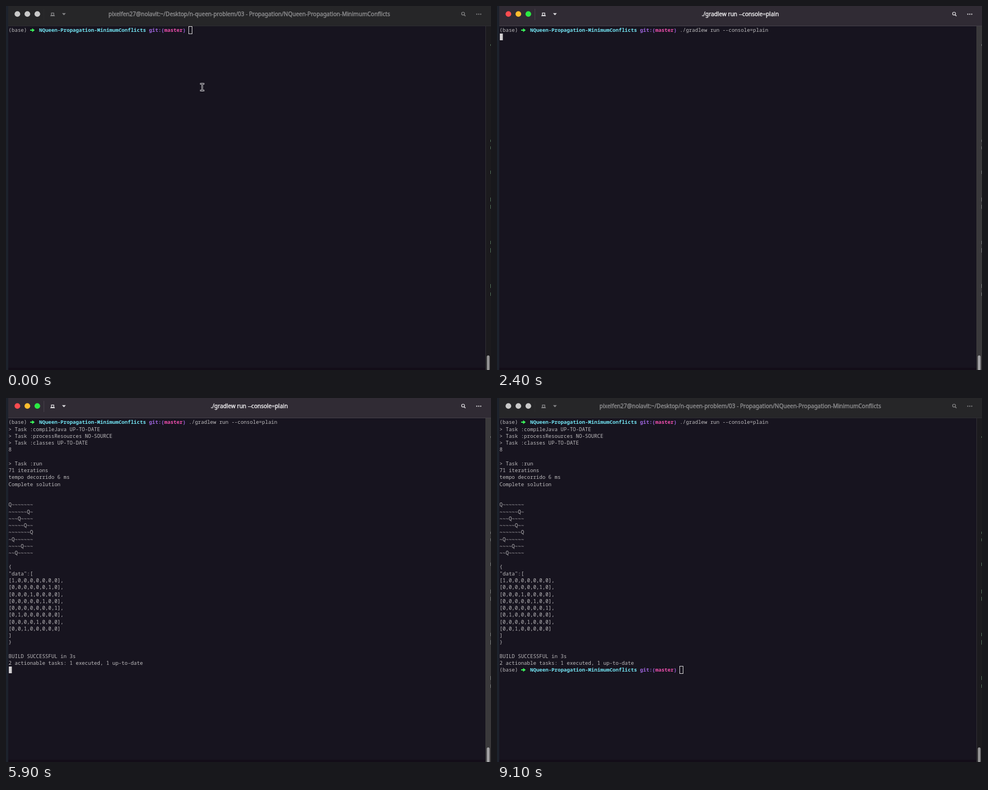
Animation, 864 px wide and 648 px high, one loop 9300 ms. Source, as an HTML page with a canvas:

```html
<!DOCTYPE html>
<html lang="en">
<head>
<meta charset="utf-8">
<title>Terminal</title>
<style>
  html, body { margin: 0; width: 100%; height: 100%; overflow: hidden; background: #17141f; }
  canvas { display: block; width: 864px; height: 648px; }
</style>
</head>
<body>
<canvas id="stage" width="864" height="648"></canvas>
<script>
const ctx = document.getElementById('stage').getContext('2d');
const LOOP = 9300, BLINK = 600;
const COL = 5.44, ROW = 12.25, LEFT = 4.6, TOP = 37;
const MONO = '9.07px "Noto Sans Mono", "DejaVu Sans Mono", monospace';
const SANS = '10.03px "Noto Sans", sans-serif';
const FG = '#bdbbbd';

const COMMAND = './gradlew run --console=plain';
const FOLDER = 'NQueen-Propagation-MinimumConflicts';
const HOME_TITLE = 'pixelfen27@nolavit:~/Desktop/n-queen-problem/03 - Propagation/' + FOLDER;

// Column of the queen in each row of the board
const queens = [0, 6, 3, 5, 7, 1, 4, 2];
const boardRow = (q, on, off, sep) =>
  Array.from({ length: 8 }, (_, i) => i === q ? on : off).join(sep);

const tasks = [
  '> Task :compileJava UP-TO-DATE',
  '> Task :processResources NO-SOURCE',
  '> Task :classes UP-TO-DATE'
];
const result = [
  '', '> Task :run', '71 iterations', 'tempo decorrido 6 ms', 'Complete solution', '', '',
  ...queens.map(q => boardRow(q, 'Q', '~', '')),
  '', '{', '"data":[',
  ...queens.map((q, i) => '[' + boardRow(q, '1', '0', ',') + (i < 7 ? '],' : ']')),
  ']', '}'
];
const summary = ['', 'BUILD SUCCESSFUL in 3s', '2 actionable tasks: 1 executed, 1 up-to-date'];

function rect(x, y, w, h, color) {
  ctx.fillStyle = color;
  ctx.fillRect(x, y, w, h);
}

function dot(x, y, r, color) {
  ctx.fillStyle = color;
  ctx.beginPath();
  ctx.arc(x, y, r, 0, Math.PI * 2);
  ctx.fill();
}

function poly(points, color) {
  ctx.fillStyle = color;
  ctx.beginPath();
  points.forEach(([x, y]) => ctx.lineTo(x, y));
  ctx.fill();
}

function line(points, color, width) {
  ctx.strokeStyle = color;
  ctx.lineWidth = width;
  ctx.beginPath();
  points.forEach(([x, y], i) => i ? ctx.lineTo(x, y) : ctx.moveTo(x, y));
  ctx.stroke();
}

function mix(a, b, k) {
  const part = (s, i) => parseInt(s.slice(i, i + 2), 16);
  return 'rgb(' + [1, 3, 5].map(i => Math.round(part(a, i) + (part(b, i) - part(a, i)) * k)) + ')';
}

function write(text, col, row, color = FG, bold = false) {
  ctx.font = (bold ? 'bold ' : '') + MONO;
  ctx.textAlign = 'left';
  ctx.fillStyle = color;
  ctx.fillText(text, LEFT + col * COL, TOP + row * ROW + 9.4);
}

function prompt(row) {
  write('(base)', 0, row);
  const y = TOP + row * ROW + 6;
  poly([[43, y - 1], [46.5, y - 1], [46.5, y - 3.4], [51.2, y],
        [46.5, y + 3.4], [46.5, y + 1], [43, y + 1]], '#3bf45c');
  write(FOLDER, 10, row, '#73e4f3', true);
  write('git:(', 46, row, '#a066e0', true);
  write('master', 51, row, '#ef4fae', true);
  write(')', 57, row, '#a066e0', true);
}

function cursor(col, row, hollow) {
  const x = Math.round(LEFT + col * COL + 0.2), y = Math.round(TOP + row * ROW);
  if (hollow) {
    ctx.strokeStyle = '#d2d0d2';
    ctx.lineWidth = 1;
    ctx.strokeRect(x - 0.5, y - 0.5, 6, 13);
  } else rect(x, y, 5.4, 12, '#d2d0d2');
}

function pointer(x, y) {
  const bars = [[[x - 2.5, y - 6], [x + 2.5, y - 6]], [[x, y - 6], [x, y + 6]], [[x - 2.5, y + 6], [x + 2.5, y + 6]]];
  ctx.lineCap = 'square';
  bars.forEach(b => line(b, '#d8d8da', 2.6));
  bars.forEach(b => line(b, '#17141f', 0.9));
  ctx.lineCap = 'butt';
}

// Window focus, stepped every 100 ms
function focusAt(t) {
  if (t < 300) return 0;
  if (t < 400) return 0.4;
  if (t < 500) return 0.85;
  if (t < 8900) return 1;
  if (t < 9000) return 0.6;
  return t < 9100 ? 0.15 : 0;
}

function header(title, focus) {
  const shade = (off, on) => mix(off, on, focus);
  rect(4, 0, 860, 36, shade('#262628', '#302b34'));
  rect(4, 35, 860, 1, shade('#2d2c30', '#443f48'));
  ['#fb4b50', '#fdbd2e', '#2bea43'].forEach((c, i) =>
    dot(20.3 + i * 17.75, 14.3, 5, shade('#cacaca', c)));
  rect(67, 5, 1, 20, shade('#2b2b2d', '#46404a'));

  const ink = shade('#858587', '#dedde0');
  ctx.strokeStyle = ink;
  ctx.lineWidth = 1.3;
  ctx.strokeRect(80.9, 12.5, 4.2, 4.2);
  rect(79, 16.6, 8, 1.5, ink);
  poly([[99.8, 12.8], [106.6, 12.8], [103.2, 16.4]], ink);

  ctx.lineWidth = 1.2;
  ctx.beginPath();
  ctx.arc(814.2, 13.6, 2.6, 0, Math.PI * 2);
  ctx.stroke();
  line([[816, 15.4], [818.5, 17.9]], ink, 1.4);
  [838.7, 842.2, 845.7].forEach(x => dot(x, 14.6, 1.1, ink));

  // A thin outline gives the title its medium weight
  ctx.font = SANS;
  ctx.textAlign = 'center';
  ctx.fillStyle = ctx.strokeStyle = shade('#8f8f91', '#f1f0f2');
  ctx.lineWidth = 0.35;
  ctx.lineJoin = 'round';
  ctx.fillText(title, 433.4, 17.8);
  ctx.strokeText(title, 433.4, 17.8);
  ctx.lineJoin = 'miter';
}

function frame(focus) {
  rect(0, 0, 864, 648, '#17141f');
  rect(0, 0, 4, 648, '#1d222c');
  rect(4, 644, 851, 4, '#130d18');
  rect(855, 36, 9, 612, mix('#1c1b1e', '#3a393b', focus));
  rect(854, 36, 1, 612, mix('#302f33', '#3a393b', focus));
  ctx.fillStyle = mix('#939394', '#a3a3a5', focus);
  ctx.beginPath();
  ctx.roundRect(856.5, 622, 5, 27, 2.5);
  ctx.fill();
  const marks = [[68, 3], [238, 4], [250, 5], [293, 6], [341, 7], [354, 7], [418, 6], [431, 8], [495, 7], [510, 6]];
  marks.forEach(([y, h]) => rect(863, y, 1, h, mix('#52705a', '#747676', focus)));
}

// Screen contents: typed lines, cursor place and the last moment the blink restarted
function screenAt(t) {
  const out = [];
  let col = 59, since = 300;
  if (t >= 1000) { col = 89; since = 1000; }
  if (t >= 2400) { col = 0; since = 2400; }
  if (t >= 2900) out.push(...tasks.slice(0, t < 3000 ? 1 : 3));
  if (t >= 5300) { out.push('8'); col = 1; since = 5300; }
  if (t >= 5800) { out.push(...result); col = 0; since = 5800; }
  if (t >= 5900) out.push(...summary);
  if (t >= 6200) col = 59;
  const row = t < 2400 ? 0 : t >= 5300 && t < 5800 ? out.length : out.length + 1;
  return { out, col, row, since };
}

function draw(t) {
  const focus = focusAt(t);
  const { out, col, row, since } = screenAt(t);
  frame(focus);
  header(t >= 2400 && t < 6200 ? COMMAND : HOME_TITLE, focus);

  prompt(0);
  if (t >= 1000) write(COMMAND, 59, 0);
  out.forEach((text, i) => write(text, 0, i + 1));
  if (t >= 6200) prompt(row);

  const hollow = t < 300 || t >= 8900;
  if (hollow || Math.floor((t - since) / BLINK) % 2 === 0) cursor(col, row, hollow);
  if (t < 1000) pointer(349.5, 144.5);
}

function tick() {
  draw(performance.now() % LOOP);
  requestAnimationFrame(tick);
}
tick();
</script>
</body>
</html>
```
